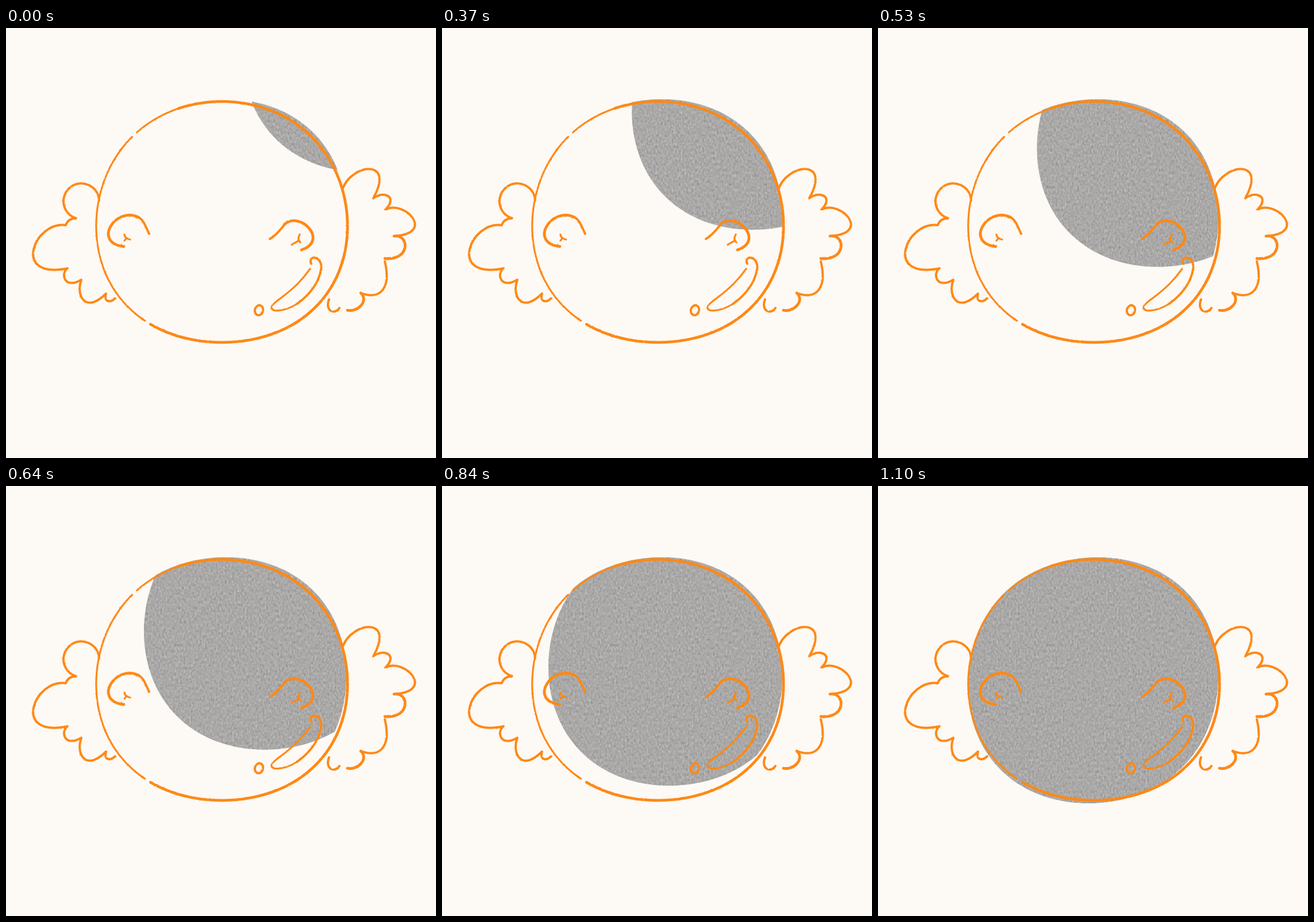
These frames come from a looping animation (748x748 px, 1120 ms). An HTML page:

```html
<!DOCTYPE html>
<html lang="en">
<head>
<meta charset="utf-8">
<title>Filling face</title>
<style>
  html, body { margin: 0; width: 100%; height: 100%; overflow: hidden; background: #fdf9f5; }
  svg { display: block; width: 100%; height: 100%; }
  #ink { fill: none; stroke: #fe8916; stroke-width: 4; stroke-linecap: round; stroke-linejoin: round; }
  #ink .thin { stroke-width: 3.2; }
  #ink .bold { stroke-width: 4.8; }
</style>
</head>
<body>
<svg viewBox="0 0 748 748">
  <defs>
    <filter id="paper" x="0" y="0" width="1" height="1" color-interpolation-filters="sRGB">
      <feTurbulence type="fractalNoise" baseFrequency=".32 .2" numOctaves="2" seed="7"/>
      <feColorMatrix values=".2 .14 0 0 .495  .2 .14 0 0 .491  .2 .14 0 0 .488  0 0 0 0 1"/>
    </filter>
    <filter id="pencil" filterUnits="userSpaceOnUse" x="0" y="0" width="748" height="748"
            color-interpolation-filters="sRGB">
      <feTurbulence type="fractalNoise" baseFrequency=".3" numOctaves="2" seed="3"/>
      <feDisplacementMap in="SourceGraphic" scale="2" xChannelSelector="R" yChannelSelector="G"/>
    </filter>
    <clipPath id="head"><path class="blob"/></clipPath>
    <clipPath id="sweep"><path class="blob" id="mover"/></clipPath>
  </defs>

  <g clip-path="url(#sweep)">
    <g clip-path="url(#head)">
      <rect x="150" y="115" width="450" height="445" filter="url(#paper)"/>
    </g>
  </g>

  <g id="ink" filter="url(#pencil)">
    <!-- face: arcs from and to an angle in degrees -->
    <path class="thin" data-arc="228 250"/>
    <path class="bold" data-arc="250 484"/>
    <path class="thin" data-arc="127 225"/>

    <!-- hair -->
    <path d="M162 300A31 31 0 1 0 122 331A17 17 0 0 0 104 343C50 335 8 438 107 418
             C94 428 102 455 131 438C121 465 138 498 174 462C170 478 182 478 190 470"/>
    <path d="M585 281C600 236 678 226 639 296C658 282 682 294 660 316C694 298 748 358 675 362"/>
    <path class="bold" d="M675 362C702 358 704 405 659 401"/>
    <path d="M659 406C670 452 652 474 617 461"/>
    <path class="bold" d="M617 461C632 474 612 495 594 491"/>
    <path d="M562 472C554 492 572 500 580 487"/>

    <!-- ears -->
    <path d="M249 358C242 344 240 334 230 329"/>
    <path class="bold" d="M230 329C190 310 150 374 205 380"/>
    <path class="thin" d="M206 359Q206 366 216 368M206 370L210 365"/>
    <path d="M459 367Q473 358 485 341"/>
    <path class="bold" d="M485 341C512 318 562 370 514 386"/>
    <path class="thin" d="M511 359Q506 368 512 373M497 377L509 370"/>

    <!-- mouth and dot -->
    <path d="M531 410C524 394 552 396 548 420C544 445 526 466 506 480"/>
    <path class="thin" d="M506 480C482 495 456 495 463 483C468 474 500 460 529 419"/>
    <path d="M438 483a6.5 8 15 0 1 4 16a6.5 8 15 0 1 -4 -16"/>
  </g>
</svg>
<script>
const { sin, cos, PI } = Math;
const HOLDS = [160, 110, 100, 110, 50, 110, 100, 100, 100, 160, 20];
const LOOP = HOLDS.reduce((a, b) => a + b);
const END = LOOP - HOLDS.at(-1);

// Hand-drawn ellipse: the radius wobbles with the angle
function outline(cx, cy, rx, ry, wobble, from = 0, to = 360) {
  const points = [];
  for (let deg = from; deg <= to; deg++) {
    const a = deg * PI / 180, r = 1 + wobble(a);
    points.push([cx + rx * r * cos(a), cy + ry * r * sin(a)].map(v => v.toFixed(1)));
  }
  return 'M' + points.join('L');
}

const squarish = a => 1 - cos(4 * a);
const faceWobble = a => .008 * squarish(a) + .008 * sin(3 * a);
const blobWobble = a => .01 * squarish(a) - .016 * sin(2 * a);

for (const el of document.querySelectorAll('[data-arc]')) {
  const [from, to] = el.dataset.arc.split(' ').map(Number);
  el.setAttribute('d', outline(375.5, 339, 218.5, 209.5, faceWobble, from, to));
}
const blob = outline(374, 338, 218, 214, blobWobble);
for (const el of document.querySelectorAll('.blob')) el.setAttribute('d', blob);

// How far the sweep still is from home; the ease is already moving at the start
const LEAD = 95;
const left = t => (1 + cos(PI * (t + LEAD) / (END + LEAD))) / 2;

// Start of the pose held at time t
function heldTime(t) {
  let start = 0;
  for (const hold of HOLDS) {
    if (t < start + hold) return start;
    start += hold;
  }
  return END;
}

const mover = document.getElementById('mover');
const begin = performance.now();

function draw() {
  const k = left(heldTime((performance.now() - begin) % LOOP));
  mover.setAttribute('transform', `translate(${260 * k} ${-306 * k ** 1.05})`);
  requestAnimationFrame(draw);
}
draw();
</script>
</body>
</html>
```
